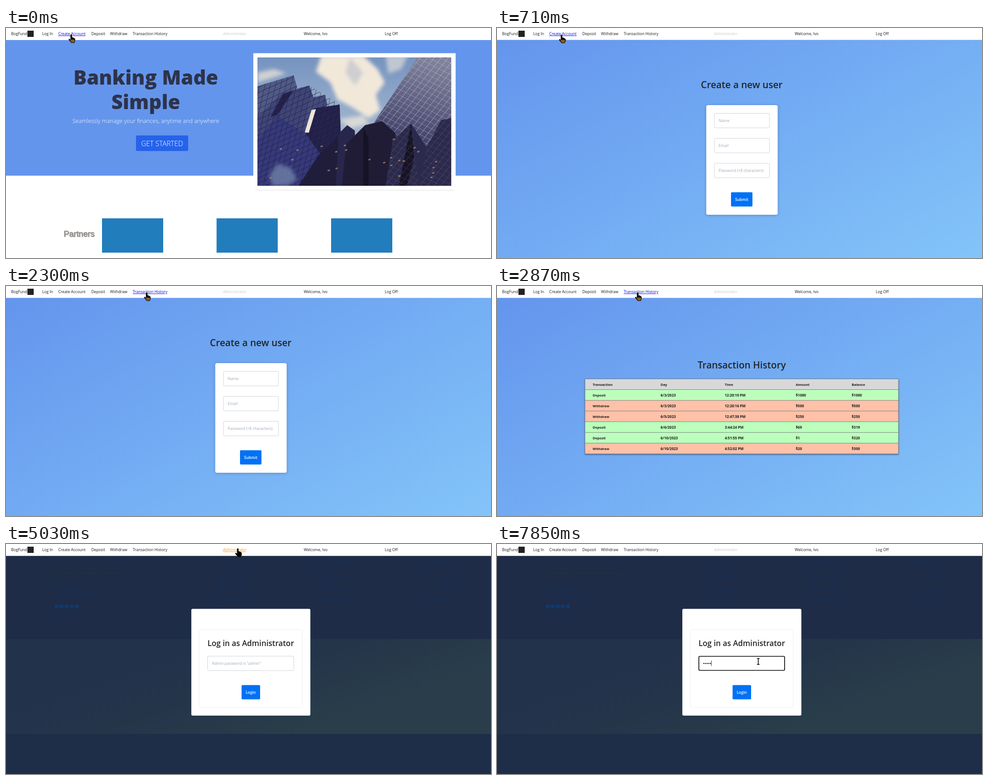
An HTML page for the animation above (8000 ms loop, 1086x516 px).

```html
<!DOCTYPE html>
<html lang="en">
<head>
<meta charset="utf-8">
<title>Online banking demo</title>
<style>
html, body { margin: 0; width: 100%; height: 100%; overflow: hidden; background: #fff; }
svg { display: block; width: 1086px; height: 516px; font: 8.65px "Open Sans", "Noto Sans", sans-serif; }
svg * { animation-duration: 8s; animation-timing-function: step-end; animation-iteration-count: infinite; }
.mid { text-anchor: middle; }
.end { text-anchor: end; }
.bold { font-weight: 700; }
.head { font-size: 21.1px; font-weight: 600; fill: #212529; text-anchor: middle; }
.hint { fill: #9eabbb; }
.field { fill: #fff; stroke: #cdd2d8; }
.btn { fill: #0171f5; }
.btn-text { fill: #fff; font-weight: 600; text-anchor: middle; }
.nav { fill: #16181b; }
.soft { filter: drop-shadow(0 1px 3px rgba(0, 0, 60, .25)); }
.lift { filter: drop-shadow(0 1.5px 1.5px rgba(0, 0, 30, .45)); }

/* scenes */
#home { animation-name: home; }
#create { animation-name: create; }
#history { animation-name: history; }
#login { animation-name: login; }
@keyframes home { 0% { visibility: visible } 8.875%, 100% { visibility: hidden } }
@keyframes create { 0% { visibility: hidden } 8.875% { visibility: visible } 35.875%, 100% { visibility: hidden } }
@keyframes history { 0% { visibility: hidden } 35.875% { visibility: visible } 62.875%, 100% { visibility: hidden } }
@keyframes login { 0% { visibility: hidden } 62.875%, 100% { visibility: visible } }

/* link hover */
#l-create { animation-name: hover-create; }
#l-deposit { animation-name: hover-deposit; }
#l-withdraw { animation-name: hover-withdraw; }
#l-history { animation-name: hover-history; }
#l-admin { fill: #ccc; font-style: italic; animation-name: hover-admin; }
@keyframes hover-create { 0% { fill: #00d; text-decoration: underline } 20%, 100% { fill: #16181b; text-decoration: none } }
@keyframes hover-deposit { 21.5% { fill: #00d; text-decoration: underline } 0%, 23.375%, 100% { fill: #16181b; text-decoration: none } }
@keyframes hover-withdraw { 23.375% { fill: #00d; text-decoration: underline } 0%, 24.875%, 100% { fill: #16181b; text-decoration: none } }
@keyframes hover-history { 24.875% { fill: #00d; text-decoration: underline } 0%, 53%, 100% { fill: #16181b; text-decoration: none } }
@keyframes hover-admin { 54.5% { fill: #f5a02c; text-decoration: underline } 0%, 68.25%, 100% { fill: #ccc; text-decoration: none } }

/* pointers */
#hand { animation-name: hand; }
#palm { animation-name: palm; }
#arrow { animation-name: arrow; }
#beam { animation-name: beam; }
@keyframes hand {
  0% { transform: translate(146px, 14.5px); visibility: visible }
  3.875% { transform: translate(145.5px, 15px) }
  5.5% { transform: translate(144.5px, 15px) }
  18.25% { transform: translate(163.5px, 15.5px) }
  20% { transform: translate(186px, 15px) }
  21.5% { transform: translate(208px, 14px) }
  23.375% { transform: translate(250px, 14px) }
  24.875% { transform: translate(293.5px, 14px) }
  26.875% { transform: translate(314px, 14px) }
  28.75% { transform: translate(315px, 14.5px); visibility: visible }
  53% { transform: translate(430px, 13px); visibility: hidden }
  54.5% { transform: translate(498px, 10px); visibility: visible }
  56.375% { transform: translate(512px, 10px) }
  57.875% { transform: translate(519px, 10px); visibility: visible }
  68.25%, 100% { transform: translate(519px, 10px); visibility: hidden }
}
@keyframes palm { 0% { opacity: 1 } 53%, 100% { opacity: 0 } }
@keyframes arrow { 0% { visibility: hidden } 53% { visibility: visible } 54.5%, 100% { visibility: hidden } }
@keyframes beam {
  0% { transform: translate(589px, 209px); visibility: hidden }
  68.25% { transform: translate(589px, 209px); visibility: visible }
  70.25% { transform: translate(599px, 264px) }
  98.125%, 100% { transform: translate(585px, 256px); visibility: visible }
}

/* password field */
#focus { animation-name: focus; }
#prompt { animation-name: prompt; }
#caret { animation-name: caret; }
#dots { animation-name: dots; }
@keyframes focus { 0% { opacity: 0 } 72.125%, 100% { opacity: 1 } }
@keyframes prompt { 0% { opacity: 1 } 82.25%, 100% { opacity: 0 } }
@keyframes caret {
  0% { transform: none; opacity: 0 }
  72.125% { opacity: 1 }
  79.125% { transform: none; opacity: 0 }
  82.25% { transform: translateX(3.7px); opacity: 1 }
  85.75% { transform: translateX(7.4px) }
  87.625% { transform: translateX(11.1px) }
  91.125% { transform: translateX(14.8px) }
  92.625%, 100% { transform: translateX(18.5px); opacity: 1 }
}
@keyframes dots {
  0% { clip-path: inset(0 100% 0 0) }
  82.25% { clip-path: inset(0 80% 0 0) }
  85.75% { clip-path: inset(0 60% 0 0) }
  87.625% { clip-path: inset(0 40% 0 0) }
  91.125% { clip-path: inset(0 20% 0 0) }
  92.625%, 100% { clip-path: inset(0) }
}
</style>
</head>
<body>
<svg viewBox="0 0 1086 516">
  <defs>
    <linearGradient id="sky" gradientUnits="userSpaceOnUse" x1="0" y1="27" x2="456" y2="860">
      <stop stop-color="#6495ed"/><stop offset="1" stop-color="#83c4f9"/>
    </linearGradient>
    <linearGradient id="dim" gradientUnits="userSpaceOnUse" x1="500" y1="213" x2="580" y2="450">
      <stop stop-color="#23324b"/><stop offset=".4" stop-color="#24354a"/><stop offset="1" stop-color="#293e4a"/>
    </linearGradient>
    <linearGradient id="air" x2="0" y2="1">
      <stop stop-color="#7593c0"/><stop offset=".6" stop-color="#a6b8d0"/>
    </linearGradient>
    <linearGradient id="tower" x1=".6" x2=".4" y2="1">
      <stop stop-color="#7f829c"/><stop offset=".5" stop-color="#5a5c80"/><stop offset="1" stop-color="#33345f"/>
    </linearGradient>
    <pattern id="panes" width="13" height="12" patternUnits="userSpaceOnUse" patternTransform="skewY(-24) skewX(-14)">
      <path d="M0 0H13M0 0V12" stroke="#17152f" stroke-width="1.6"/>
    </pattern>
    <pattern id="glass" width="11" height="13" patternUnits="userSpaceOnUse" patternTransform="skewY(27) skewX(-30)">
      <path d="M0 0H11M0 0V13" stroke="#cfcac8" stroke-width="1.3"/>
    </pattern>
    <clipPath id="crop"><rect x="563" y="66" width="434" height="288"/></clipPath>
    <clipPath id="page"><rect y="27" width="1086" height="489"/></clipPath>
    <filter id="blur"><feGaussianBlur stdDeviation="4"/></filter>
  </defs>

  <g id="home">
    <rect width="1086" height="516" fill="#fff"/>
    <rect y="27" width="1086" height="304.300" fill="#6495ed"/>
    <g class="mid" font-size="44.2" font-weight="800" fill="#2d334a">
      <text x="313" y="127">Banking Made</text><text x="313" y="182">Simple</text>
    </g>
    <g class="mid" font-weight="300" fill="#fff">
      <text x="313" y="213" font-size="12.8">Seamlessly manage your finances, anytime and anywhere</text>
      <rect x="291" y="241" width="117" height="35" rx="3" fill="#2563eb"/>
      <text x="349.500" y="265" font-size="15.6">GET STARTED</text>
    </g>
    <rect x="557" y="357" width="448" height="7.300" fill="#d6d6e2"/>
    <rect x="553.800" y="56.500" width="453" height="307" fill="#fff"/>
    <g clip-path="url(#crop)">
      <rect x="563" y="66" width="434" height="288" fill="url(#air)"/>
      <g fill="#f1e8da" filter="url(#blur)">
        <path d="M706 62L800 62 832 92 848 122 828 150 838 185 812 202 775 178 742 160 726 122 694 98Z"/>
        <path d="M850 62L900 62 885 92 856 102Z" opacity=".6"/>
        <path d="M563 100L600 92 628 102 563 122ZM745 205L800 196 812 215 770 225Z" opacity=".7"/>
        <path d="M770 66L800 100 782 130 760 100Z" fill="#b9bfcb" opacity=".6"/>
      </g>
      <path d="M922 66H997V290L866 252 848 218 824 212Z" fill="url(#tower)"/>
      <path d="M922 66H997V290L866 252 824 212Z" fill="url(#glass)" opacity=".8"/>
      <path d="M563 131L644 106 652 134 610 190 563 215Z" fill="#505a86"/>
      <path d="M563 200L618 146 679 129 692 165 672 240 563 300Z" fill="#3f4577"/>
      <path d="M676 158L714 150 720 172 690 215 668 232Z" fill="#454b7c"/>
      <path d="M563 252L607 197 672 238 690 180 747 172 752 300 740 354H563Z" fill="#36397a"/>
      <path d="M620 148L644 140 608 195 592 200ZM672 238L690 180 747 172 752 300 740 354H672L705 285Z" fill="#25234d"/>
      <path d="M563 131L644 106 652 134 679 129 714 150 747 172 752 300 740 354H563Z" fill="url(#panes)" opacity=".8"/>
      <path d="M684 184L694 182 678 235 669 234Z" fill="#efe5d6"/>
      <path d="M590 330L608 304 638 314 652 340 630 354H596Z" fill="#6f80a8" opacity=".8" filter="url(#blur)"/>
      <path d="M655 354L700 285 742 245 755 354Z" fill="#201d3b"/>
      <path d="M746 236L764 218 781 230 786 354H738Z" fill="#28264c"/>
      <path d="M762 260L804 218 842 209 872 236 880 354H752Z" fill="#201c36"/>
      <path d="M866 252L907 214 942 268 974 207 997 202V354H850Z" fill="#2b294c"/>
      <path d="M800 222L812 250 812 354H800ZM907 214L914 290 898 354H880Z" fill="#171326"/>
      <path d="M942 268L974 207 997 202V354H925ZM866 252L907 214 925 354H850Z" fill="url(#glass)" opacity=".25"/>
      <path id="lights" fill="none" stroke="#b98d66" stroke-width="3" opacity=".7"/>
    </g>
    <text x="129" y="468" font-family="Liberation Sans, Arial, sans-serif" font-size="18.300" fill="#8d8783" stroke="#8d8783" stroke-width=".4" style="text-shadow:1px 1px 1px #aaa">Partners</text>
    <path d="M215 427h137v77h-137zM471.500 427h137v77h-137zM728 427h137v77h-137z" fill="#227dbc"/>
  </g>

  <g id="create">
    <rect width="1086" height="516" fill="url(#sky)"/>
    <text class="head" x="548" y="135">Create a new user</text>
    <rect class="soft" x="468.500" y="173" width="160" height="246" rx="4" fill="#fff"/>
    <g class="field">
      <rect x="487" y="191.500" width="123" height="32.500" rx="2"/>
      <rect x="487" y="247.500" width="123" height="32.500" rx="2"/>
      <rect x="487" y="303.500" width="123" height="32.500" rx="2"/>
    </g>
    <g class="hint">
      <text x="496.500" y="211">Name</text><text x="496.500" y="267">Email</text>
      <text x="496.500" y="323">Password (+8 characters)</text>
    </g>
    <rect class="btn" x="524" y="368.500" width="48" height="32" rx="2"/>
    <text class="btn-text" x="548" y="388">Submit</text>
  </g>

  <g id="history">
    <rect width="1086" height="516" fill="url(#sky)"/>
    <text class="head" x="548" y="184.500">Transaction History</text>
    <rect class="lift" x="196.500" y="208" width="703" height="169.500" rx="1.500" fill="#7d8184"/>
    <g id="rows" class="bold" fill="#1b1b1f"></g>
  </g>

  <g id="login">
    <rect width="1086" height="516" fill="#1e2c47"/>
    <rect y="213" width="1086" height="213" fill="url(#dim)"/>
    <rect y="426" width="1086" height="90" fill="#1f2e48"/>
    <g clip-path="url(#page)" fill="#12305f">
      <g id="links" class="end"></g>
      <g fill="#26343f">
        <text x="101" y="28">Banking Made Simple</text>
        <text x="101" y="57">A simple place to look after your money,</text>
        <text x="101" y="69">built for saving, paying and planning every day</text>
        <text x="101" y="81">with ease.</text>
      </g>
      <text x="101" y="104">+0-000-000-0000</text>
      <text x="101" y="117">someone@example.com</text>
      <path d="M109 136h8v8h-8zM120.500 136h8v8h-8zM132 136h8v8h-8zM143.500 136h8v8h-8zM155 136h8v8h-8z" fill="#0d3a70"/>
    </g>
    <rect x="415" y="145.500" width="266.500" height="239.500" rx="3" fill="#fff"/>
    <rect x="432.500" y="191.500" width="231" height="175.500" rx="6" fill="#fff" stroke="#ededf0"/>
    <text class="head" x="548" y="229" style="font-size:17.3px">Log in as Administrator</text>
    <rect class="field" x="451.500" y="251.500" width="193" height="32.500" rx="2.500"/>
    <text id="prompt" class="hint" x="461" y="271">Admin password is "admin"</text>
    <rect class="btn" x="527.500" y="316.500" width="41.500" height="32" rx="2"/>
    <text class="btn-text" x="548" y="336">Login</text>
  </g>
  <rect id="focus" x="452" y="252" width="192" height="31.500" rx="2.500" fill="none" stroke="#0a0a0a" stroke-width="1.700"/>
  <g id="dots" fill="#222">
    <rect x="461.300" y="264" width="18.500" height="8" fill="none"/>
    <circle cx="463" cy="268" r="1.350"/><circle cx="466.700" cy="268" r="1.350"/><circle cx="470.400" cy="268" r="1.350"/>
    <circle cx="474.100" cy="268" r="1.350"/><circle cx="477.800" cy="268" r="1.350"/>
  </g>
  <rect id="caret" x="461" y="261.500" width="1" height="12" fill="#222"/>

  <rect width="1086" height="26.700" fill="#fff"/>
  <g class="nav">
    <text x="11.500" y="16">BogFund</text>
    <rect x="48" y="6" width="14" height="14" fill="#222"/>
    <text x="81" y="16">Log In</text>
    <text id="l-create" x="117" y="16">Create Account</text>
    <text id="l-deposit" x="191" y="16">Deposit</text>
    <text id="l-withdraw" x="233" y="16">Withdraw</text>
    <text id="l-history" x="283.700" y="16">Transaction History</text>
    <text id="l-admin" x="486" y="16">Administrator</text>
    <text x="666.700" y="16">Welcome, Ivo</text>
    <text x="848" y="16">Log Off</text>
  </g>

  <g id="hand">
    <path d="M-1.700 1.500a1.700 1.700 0 0 1 3.400 0V6.500c2-.6 2.800.2 3 1 1.500-.3 2.300.3 2.500 1.200 1-.1 1.600.6 1.600 1.800V14c0 2.500-1.600 3-1.800 5H0c-1.500-3-5-5.500-6-8 .2-1.600 2.600-1.200 4.300.8Z"/>
    <path id="palm" d="M-3 12.500Q3 10.500 7.800 12V14c0 2-1.400 2.600-1.700 4H.7C-.1 16.200-1.800 14.600-3 12.500Z" fill="#8a5c22"/>
  </g>
  <path id="arrow" d="M430 12v12.500l3-2.700 2 4.400 1.800-.8-2-4.300h3.900Z" stroke="#fff" stroke-width=".6"/>
  <path id="beam" d="M-3 .8H-1Q0 .8 0 2V13Q0 14.200-1 14.200H-3M3 .8H1Q0 .8 0 2M0 13Q0 14.200 1 14.200H3" fill="none" stroke="#000" stroke-width="1.600"/>
</svg>
<script>
const byId = id => document.getElementById(id);
const label = (x, y, s, size) => `<text x="${x}" y="${y}" font-size="${size}">${s}</text>`;

const columns = [214.3, 366.3, 510, 669, 794.3];
const table = [
  "Transaction,Day,Time,Amount,Balance",
  "Deposit,6/3/2023,12:20:10 PM,$1000,$1000",
  "Withdraw,6/3/2023,12:20:16 PM,$500,$500",
  "Withdraw,6/5/2023,12:47:38 PM,$250,$250",
  "Deposit,6/6/2023,3:44:24 PM,$69,$319",
  "Deposit,6/10/2023,4:51:55 PM,$1,$320",
  "Withdraw,6/10/2023,4:52:02 PM,$20,$300"
];
const tint = { T: "#d8d8d8", D: "#bcffbc", W: "#ffc1a8" };
byId("rows").innerHTML = table.map((row, i) => {
  const y = 209 + i * 24;
  const cells = row.split(",").map((s, c) => label(columns[c], y + 15, s, /\d/.test(s) ? 8 : 7.6));
  return `<rect x="197.500" y="${y}" width="701" height="23" fill="${tint[row[0]]}"/>` + cells.join("");
}).join("");

const footer = {
  536: ["Our Mission", "Our Vision", "Team Excellence", "Customer Focus", "Innovation Drive"],
  768: ["Services", "Account Management", "Payment Solutions", "Wealth Advisory", "Mobile Banking"],
  999: ["Resources", "Business Stories", "Banking", "Finance", "Refund Policy"]
};
byId("links").innerHTML = Object.entries(footer).map(([x, names]) =>
  names.map((s, i) => label(x, 18.5 + i * 27.5, s, 8.65)).join("")).join("");

// scattered lit windows
let seed = 7;
const rand = () => (seed = seed * 16807 % 2147483647) / 2147483647;
byId("lights").setAttribute("d", Array.from({ length: 24 }, () =>
  `M${(590 + rand() * 395).toFixed(1)} ${(245 + rand() * 100).toFixed(1)}l5-1.500`).join(""));
</script>
</body>
</html>
```
